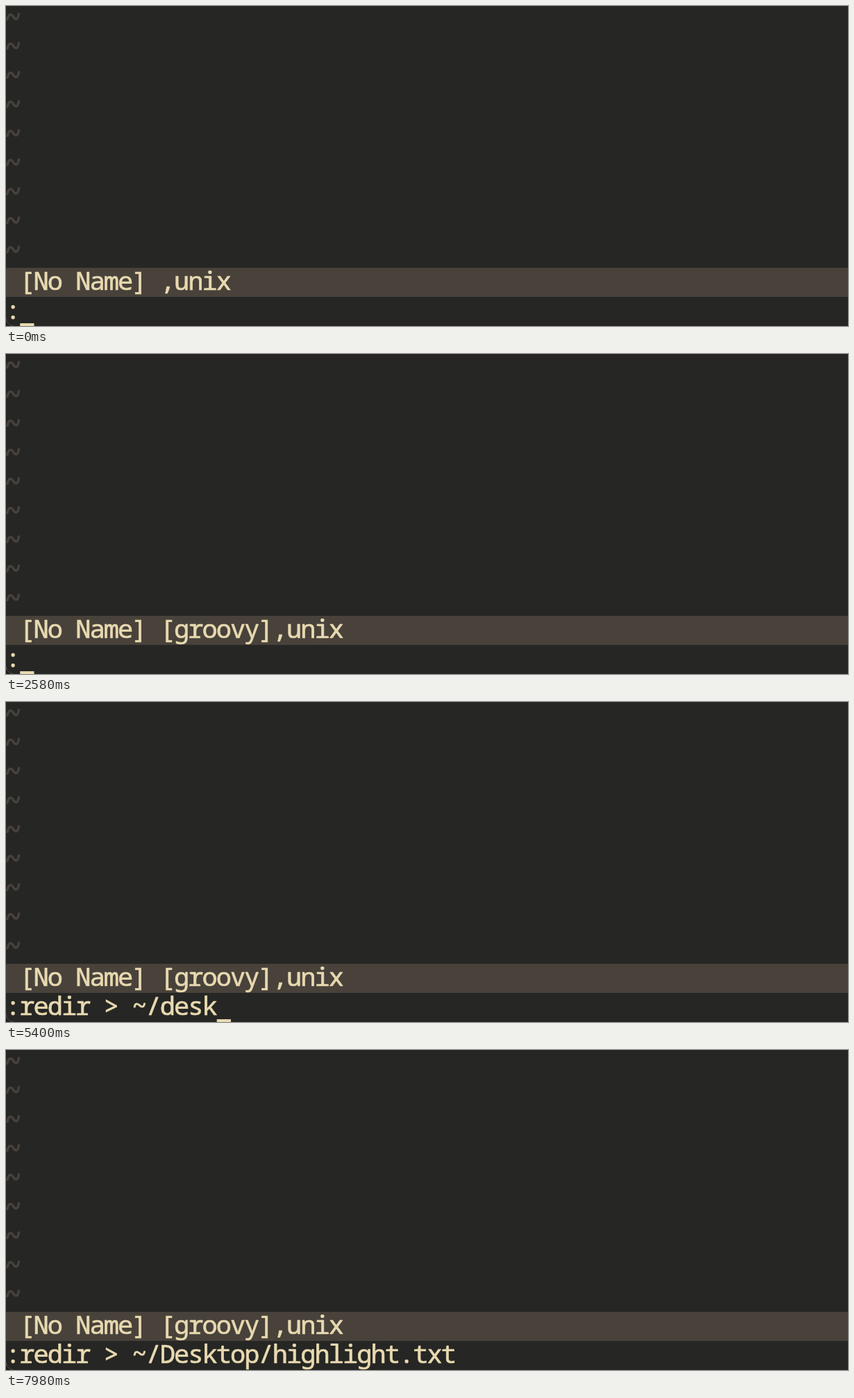
Write an HTML page with a canvas that moves like this. It is 1213 px wide and 462 px high and loops after 8 s.

```html
<!DOCTYPE html>
<html lang="en">
<head>
<meta charset="utf-8">
<title>Command line</title>
<style>
  html, body { margin: 0; width: 100%; height: 100%; overflow: hidden; background: #262624; }
  canvas { display: block; width: 1213px; height: 462px; }
</style>
</head>
<body>
<canvas id="stage" width="1213" height="462"></canvas>
<script>
const ctx = document.getElementById('stage').getContext('2d');
const W = 1213, H = 462, CELL = 20.25, ROW = 42, LOOP = 8000;
const BG = '#262624', BAR = '#48423b', FG = '#e8d9b0', DIM = '#48423c';

// Each entry: [text, times at which its characters appear]
const FIRST = [
  ['set ft=', [60, 180, 300, 420, 540, 660, 840]],
  ['groovy', [1020, 1200, 1260, 1320, 1380, 1500]]
];
const SECOND = [
  ['redir ', [3180, 3240, 3360, 3420, 3540, 3840]],
  ['> ~/', [4020, 4140, 4320, 4560]],
  ['desk', [4680, 4800, 5220, 5400]]
];
const FILE = [
  ['high', [6120, 6180, 6360, 6480]],
  ['light', [6660, 6780, 6900, 6960, 7080]],
  ['.txt', [7380, 7560, 7680, 7800]]
];
const ENTER_1 = 1680, FILETYPE = 1740, REOPEN = 2040, COMPLETE = 5520, ENTER_2 = 7980;

function typed(parts, t) {
  return parts.map(([text, times]) =>
    text.slice(0, times.filter(at => at <= t).length)).join('');
}

function command(t) {
  if (t < REOPEN) return ':' + typed(FIRST, t);
  if (t < COMPLETE) return ':' + typed(SECOND, t);
  return ':redir > ~/Desktop/' + typed(FILE, t);
}

function cursorShown(t) {
  return t < ENTER_1 || (t >= REOPEN && t < ENTER_2);
}

function print(text, col, baseline) {
  [...text].forEach((ch, i) => {
    const x = (col + i + 0.5) * CELL;
    ctx.fillText(ch, x, baseline);
    ctx.strokeText(ch, x, baseline);
  });
}

function tilde(y) {
  ctx.beginPath();
  ctx.moveTo(2, y + 4);
  ctx.bezierCurveTo(4, y - 6, 8, y - 4, 10.5, y);
  ctx.bezierCurveTo(13, y + 4, 17, y + 6, 18.5, y - 4);
  ctx.stroke();
}

function corner() {
  ctx.beginPath();
  ctx.moveTo(0, 450);
  ctx.quadraticCurveTo(1, 461, 12, H);
  ctx.lineTo(0, H);
  ctx.fillStyle = '#1f1d1c';
  ctx.fill();
  ctx.beginPath();
  ctx.moveTo(0, 451);
  ctx.quadraticCurveTo(1, 461, 11, H);
  ctx.strokeStyle = '#55514c';
  ctx.lineWidth = 1;
  ctx.stroke();
}

function draw(t) {
  ctx.fillStyle = BG;
  ctx.fillRect(0, 0, W, H);
  ctx.fillStyle = BAR;
  ctx.fillRect(0, 9 * ROW, W, ROW);

  ctx.lineCap = ctx.lineJoin = 'round';
  ctx.strokeStyle = DIM;
  ctx.lineWidth = 3.4;
  for (let row = 0; row < 9; row++) tilde(15.5 + row * ROW);
  corner();

  ctx.font = '500 37px "Noto Sans Mono", "DejaVu Sans Mono", monospace';
  ctx.textAlign = 'center';
  ctx.textBaseline = 'alphabetic';
  ctx.fillStyle = ctx.strokeStyle = FG;
  ctx.lineWidth = 0.7;
  print('[No Name] ' + (t < FILETYPE ? '' : '[groovy]') + ',unix', 1, 410);

  const line = command(t);
  print(line, 0, 452);
  if (cursorShown(t)) ctx.fillRect(line.length * CELL, 458, CELL, 4);
}

function tick() {
  draw(performance.now() % LOOP);
  requestAnimationFrame(tick);
}
tick();
</script>
</body>
</html>
```
